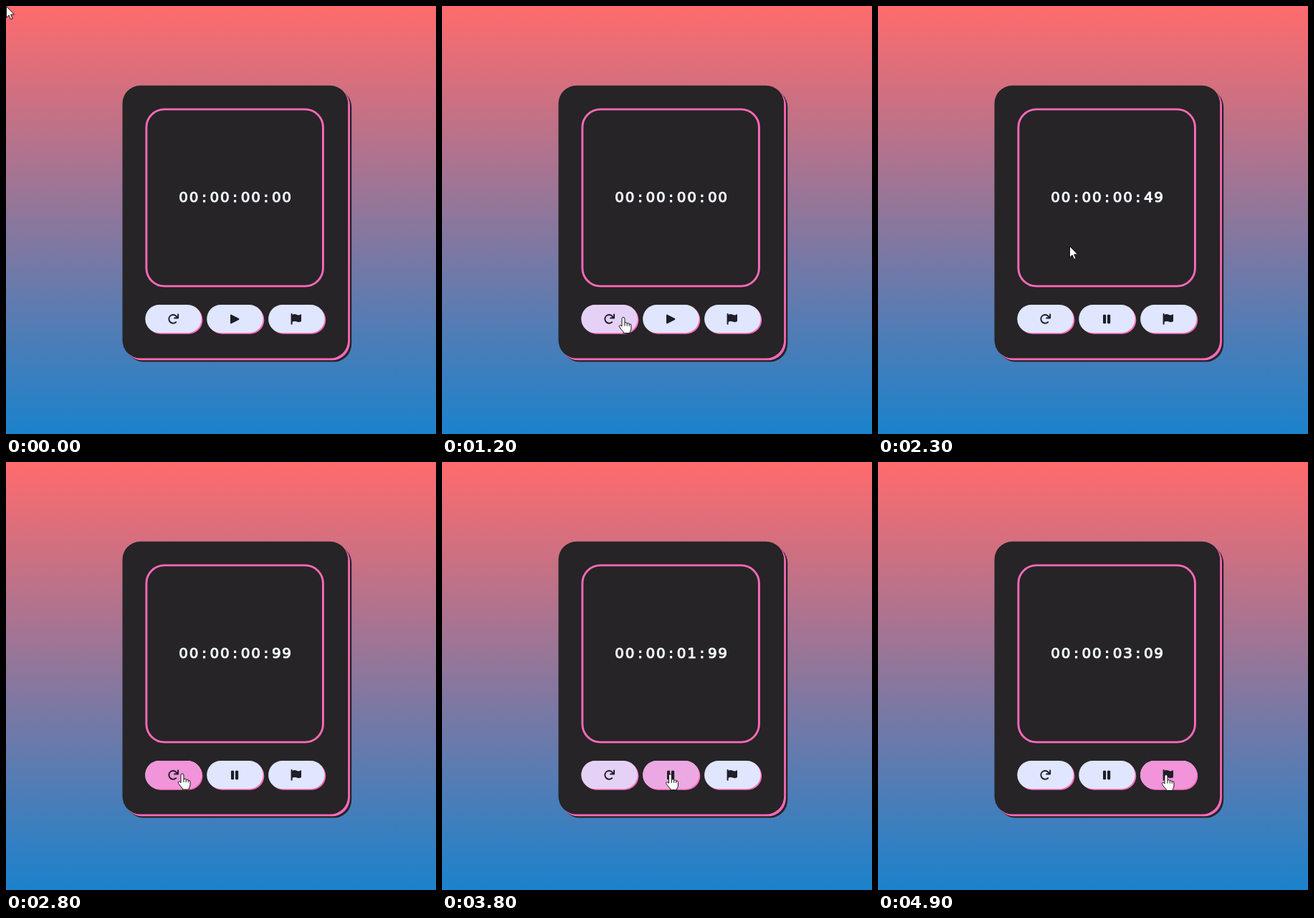
Animation, 600 px wide and 596 px high, one loop 5 s. Source, as an HTML page:

```html
<!DOCTYPE html>
<html lang="en">
<head>
<meta charset="utf-8">
<title>Stopwatch</title>
<style>
  html, body { margin: 0; height: 100%; overflow: hidden; }
  body { background: linear-gradient(#ff6b6d, #1a82cc); }
  svg { display: block; width: 600px; height: 596px; }
  #time {
    font: 20px "DejaVu Sans", Verdana, sans-serif;
    text-anchor: middle;
    fill: #f4f8ff; stroke: #f4f8ff; stroke-width: 1px;
  }
  .icon { fill: #1f1f29; }
  .line { fill: none; stroke: #1f1f29; stroke-width: 2; stroke-linecap: round; stroke-linejoin: round; }
  .cursor { fill: #fff; stroke: #111; stroke-linejoin: round; }
</style>
</head>
<body>
<svg viewBox="0 0 600 596">
  <g id="card"></g>
  <rect x="195.9" y="143.9" width="246.5" height="246.2" rx="25" fill="none" stroke="#ff69b9" stroke-width="2.9"/>
  <text id="time" y="272.9"></text>
  <g id="buttons"></g>
  <g class="icon">
    <path class="line" d="M238.6 433.4A5.9 5.9 0 1 0 237.2 440.2M240.1 429.6v4.9h-5"/>
    <path id="play" d="M314 430.6v10.8l10.4-5.4z" stroke="#1f1f29" stroke-width="2" stroke-linejoin="round"/>
    <g id="pause">
      <rect x="314" y="429.8" width="4.2" height="12.4" rx="1.3"/>
      <rect x="320" y="429.8" width="4.2" height="12.4" rx="1.3"/>
    </g>
    <path d="M397.6 429q0-1 1-1t1 1v.8q3-1.5 6 0t5.2-.3q1.2-.5 1.2.8v8.2q0 .8-.8 1.1-3 1.2-5.6 0t-6 .2v3q0 1-1 1t-1-1z"/>
  </g>
  <path id="arrow" class="cursor" d="M.5 .5V16.2L4.1 12.8 6.6 18.6 9.1 17.5 6.6 11.9H11.6Z"/>
  <path id="hand" class="cursor" d="M-2 2Q-2 0 0 0T2 2V7.5Q4.6 6.2 5.2 8.4 7.6 7.2 8.2 9.4 11 8.6 11 11.4V15.5Q11 18 9.3 20V22H.2V20.4Q-2.6 17.6-5.6 13.2-6.4 11.4-4.6 11-3.4 10.9-2 12.6ZM2 7.5V12M5.2 8.4V12.2M8.2 9.4V12.4"/>
</svg>
<script>
const LOOP = 5000, STEP = 100, FADE = 300;
const ENTER = 800, START = 1800;
const DARK = '#262426', PINK = '#ff69b9';
const BUTTON = { x: 194.3, y: 416, w: 78.5, h: 39.3, pitch: 85.9 };

// Where the pointer rests
const STOPS = [
  { from: ENTER, to: ENTER, x: 1, y: 282 },
  { from: 1200, to: 1200, x: 253, y: 433.5 },
  { from: 1400, to: START, x: 319, y: 430 },
  { from: 2300, to: 2300, x: 267, y: 334 },
  { from: 2700, to: 3400, x: 246, y: 434 },
  { from: 4240, to: LOOP, x: 402, y: 435.5 }
];

const $ = id => document.getElementById(id);
const rect = (x, y, w, h, r, fill, more = '') =>
  `<rect x="${x}" y="${y}" width="${w}" height="${h}" rx="${r}" fill="${fill}" ${more}/>`;
const pad = n => String(n).padStart(2, '0');
const clamp = v => Math.min(1, Math.max(0, v));
const smooth = p => p * p * (3 - 2 * p);
const show = (el, on) => { el.style.display = on ? '' : 'none'; };

function pointer(t) {
  if (t < ENTER) return { x: 0, y: 0 };
  const i = STOPS.findLastIndex(s => s.from <= t), a = STOPS[i], b = STOPS[i + 1];
  if (t <= a.to) return a;
  const p = smooth((t - a.to) / (b.from - a.to));
  return { x: a.x + (b.x - a.x) * p, y: a.y + (b.y - a.y) * p };
}

// Index of the button under a point, or -1
function buttonAt({ x, y }) {
  const { x: left, y: top, w, h, pitch } = BUTTON;
  const i = Math.floor((x - left) / pitch);
  return y >= top && y <= top + h && i >= 0 && x - left - i * pitch <= w ? i : -1;
}

// Hover colour builds up while the pointer is inside and fades after it leaves
function glow(i, t) {
  let g = 0;
  for (let s = 0; s <= t; s += STEP)
    g = clamp(g + (buttonAt(pointer(s)) === i ? 1 : -1) * STEP / FADE);
  return smooth(g);
}

$('card').innerHTML = [[5, DARK], [2.7, PINK], [0, DARK]]
  .map(([d, c]) => rect(162.5 + d, 110.8 + d, 314.7, 379.8, 25, c)).join('');
$('buttons').innerHTML = [0, 1, 2].map(i => {
  const { y, w, h } = BUTTON, x = BUTTON.x + i * BUTTON.pitch;
  return rect(x + 1.6, y + 1.5, w, h, h / 2, PINK) +
    rect(x, y, w, h, h / 2, '#dfe6fe') +
    rect(x, y, w, h, h / 2, '#f194da', 'class="glow"');
}).join('');
$('time').setAttribute('x', Array.from({ length: 11 }, (_, i) => 247.7 + 14.4 * i).join(' '));
const glows = document.querySelectorAll('.glow');

function draw(t) {
  const n = Math.max(0, Math.floor((t - START) / 10) - 1);
  $('time').textContent = `00:00:${pad(Math.floor(n / 100))}:${pad(n % 100)}`;
  glows.forEach((el, i) => el.setAttribute('opacity', glow(i, t)));
  show($('play'), t < START);
  show($('pause'), t >= START);

  const pos = pointer(t), over = buttonAt(pos) >= 0;
  const visible = t < 300 || t >= ENTER;
  show($('arrow'), visible && !over);
  show($('hand'), visible && over);
  $(over ? 'hand' : 'arrow').setAttribute('transform', `translate(${pos.x} ${pos.y})`);
}

const begin = performance.now();
function tick() {
  const t = (performance.now() - begin) % LOOP;
  draw(Math.floor(t / STEP) * STEP);
  requestAnimationFrame(tick);
}
tick();
</script>
</body>
</html>
```
